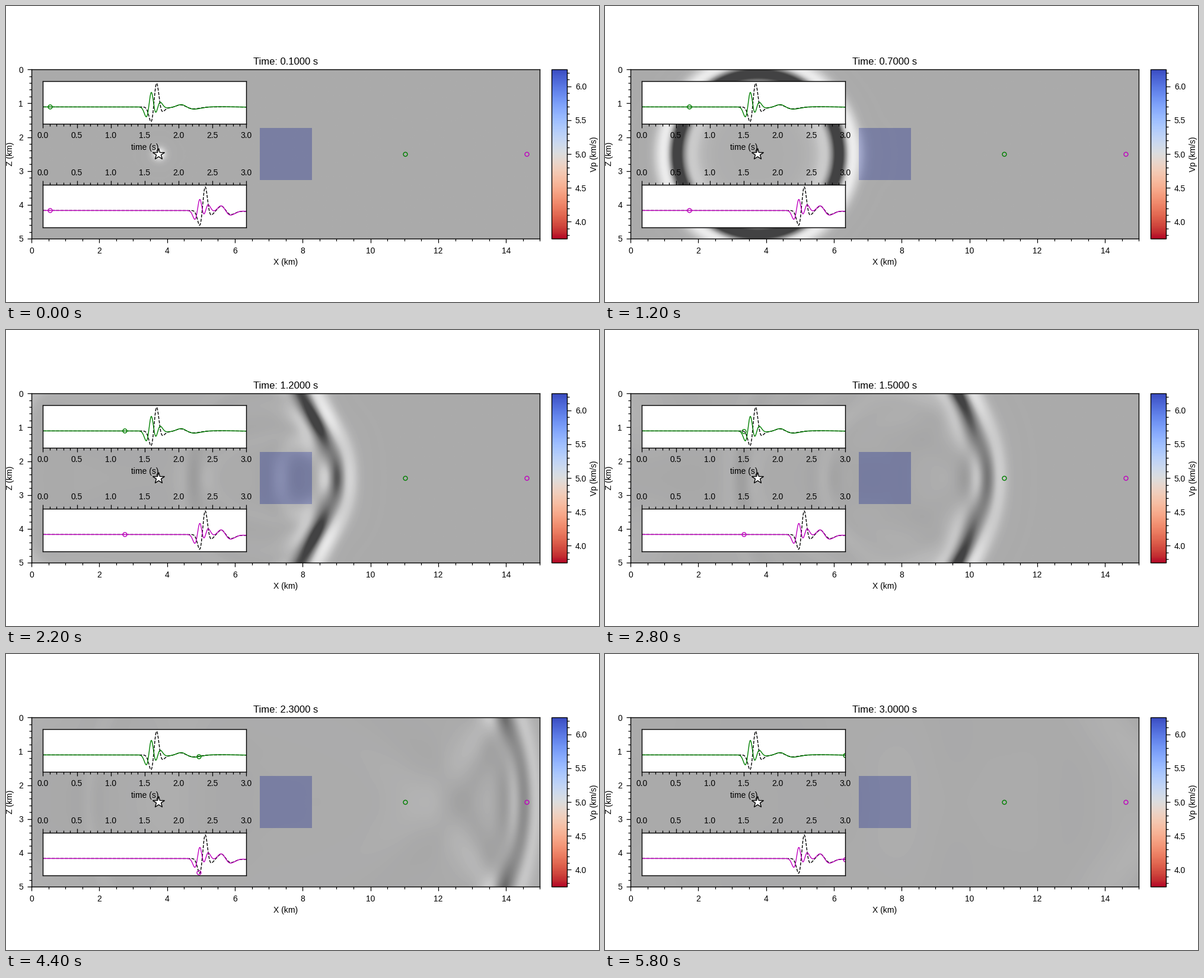
A matplotlib script for the animation above (6 s loop, 1000x500 px).

```python
import numpy as np
import matplotlib.pyplot as plt
from matplotlib.animation import FuncAnimation
from matplotlib.ticker import AutoMinorLocator, MultipleLocator

plt.rcParams.update({
    "font.family": "Liberation Sans", "font.size": 10, "axes.titlesize": 12,
    "axes.linewidth": 1.0, "lines.linewidth": 1.0,
})
for k in ("xtick", "ytick"):
    plt.rcParams.update({
        f"{k}.major.size": 5, f"{k}.minor.size": 3, f"{k}.major.pad": 5,
        f"{k}.major.width": 0.9, f"{k}.minor.width": 0.9,
    })

W, H, DPI = 1000, 500, 100
FRAMES, STEP = 30, 0.1               # simulated seconds per frame
LX, LZ, DX, DT = 15.0, 5.0, 0.05, 0.0025
PAD = 40                             # sponge cells around the model
NX, NZ = round(LX / DX) + 1, round(LZ / DX) + 1
XS = np.arange(NX) * DX
ZS = np.arange(NZ) * DX
SHOT = (3.75, 2.5)
RECEIVERS = (11.03, 14.615)
V0, V1, FREQ = 5.0, 6.25, 5.0

vp = np.full((NZ, NX), V0)
vp[np.ix_((ZS > 1.74) & (ZS < 3.26), (XS > 6.74) & (XS < 8.26))] = V1


def ricker(t):
    a = (np.pi * FREQ * (t - 1 / FREQ)) ** 2
    return (1 - 2 * a) * np.exp(-a)


def sponge(n):
    i = np.arange(n + 2 * PAD)
    d = np.maximum(0, np.maximum(PAD - i, i - (n + PAD - 1)))
    return np.exp(-(0.006 * d) ** 2)


def simulate(vel):
    """Acoustic wave equation, fourth order in space; snapshots and traces."""
    c = ((np.pad(vel, PAD, mode="edge") * DT / DX) ** 2).astype(np.float32)
    damp = np.outer(sponge(NZ), sponge(NX)).astype(np.float32)
    p, old = np.zeros_like(c), np.zeros_like(c)
    lap = np.zeros_like(c)
    iz, ix = round(SHOT[1] / DX) + PAD, round(SHOT[0] / DX) + PAD
    inner = slice(PAD, -PAD)
    every = round(STEP / DT)
    snaps, traces = [], [[0.0] * len(RECEIVERS)]
    for n in range(FRAMES * every):
        m = p[2:-2, 2:-2]
        lap[2:-2, 2:-2] = (
            -5 * m
            + 4 / 3 * (p[1:-3, 2:-2] + p[3:-1, 2:-2]
                       + p[2:-2, 1:-3] + p[2:-2, 3:-1])
            - 1 / 12 * (p[:-4, 2:-2] + p[4:, 2:-2]
                        + p[2:-2, :-4] + p[2:-2, 4:]))
        new = 2 * p - old * damp + c * lap
        new[iz, ix] += ricker(n * DT)
        new *= damp
        old, p = p, new
        traces.append(np.interp(RECEIVERS, XS, p[iz, inner]))
        if (n + 1) % every == 0:
            snaps.append(p[inner, inner].copy())
    return snaps, np.array(traces).T


snaps, box_traces = simulate(vp)
_, flat_traces = simulate(np.full_like(vp, V0))
times = np.arange(flat_traces.shape[1]) * DT

# Colour limit: peak of the undisturbed wave 4.5 km from the shot
clip = flat_traces[0].max() * np.sqrt((RECEIVERS[0] - SHOT[0]) / 4.5)

fig = plt.figure(figsize=(W / DPI, H / DPI), dpi=DPI, facecolor="white")


def axes_px(left, top, right, bottom):
    return fig.add_axes([left / W, 1 - bottom / H,
                         (right - left) / W, (bottom - top) / H])


def hollow(ax, x, y, color):
    return ax.plot([x], [y], "o", ms=5, mfc="none", mec=color, mew=1)[0]


ax = axes_px(43, 107.2, 900.4, 393)
extent = [0, LX, LZ, 0]
model = ax.imshow(vp, cmap="coolwarm_r", vmin=3.75, vmax=6.25,
                  extent=extent, aspect="auto", interpolation="nearest")
wave = ax.imshow(snaps[0], cmap="Greys", vmin=-clip, vmax=clip, alpha=0.7,
                 extent=extent, aspect="auto", interpolation="bilinear")
ax.set_xlabel("X (km)")
ax.set_ylabel("Z (km)", labelpad=5)
ax.xaxis.set_major_locator(MultipleLocator(2))
ax.yaxis.set_major_locator(MultipleLocator(1))
ax.xaxis.set_minor_locator(AutoMinorLocator(4))
ax.yaxis.set_minor_locator(AutoMinorLocator(5))
title = ax.set_title("")

bar = fig.colorbar(model, cax=axes_px(920, 107.2, 946, 393))
bar.set_label("Vp (km/s)")
bar.ax.yaxis.set_major_locator(MultipleLocator(0.5))
bar.ax.yaxis.set_minor_locator(AutoMinorLocator(5))

ax.plot(*SHOT, "*", ms=15, mfc="white", mec="black", mew=1)
dots = []
for i, (color, top) in enumerate((("g", 127.4), ("m", 302.4))):
    hollow(ax, RECEIVERS[i], SHOT[1], color)
    sub = axes_px(62.4, top, 405.4, top + 71.2)
    sub.plot(times, flat_traces[i], "k--")
    sub.plot(times, box_traces[i], color=color)
    sub.set_xlim(0, 3)
    sub.set_yticks([])
    sub.xaxis.set_major_locator(MultipleLocator(0.5))
    sub.xaxis.set_minor_locator(AutoMinorLocator(5))
    if i == 0:
        sub.set_xlabel("time (s)")
    else:
        sub.xaxis.tick_top()
    dots.append(hollow(sub, 0, 0, color))


def draw(i):
    t = (i + 1) * STEP
    wave.set_data(snaps[i])
    title.set_text(f"Time: {t:.4f} s")
    for dot, trace in zip(dots, flat_traces):
        dot.set_data([t], [np.interp(t, times, trace)])
    return [wave, title, *dots]


anim = FuncAnimation(fig, draw, frames=FRAMES, interval=200,
                     repeat=True, repeat_delay=0, blit=False)
plt.show()
```
